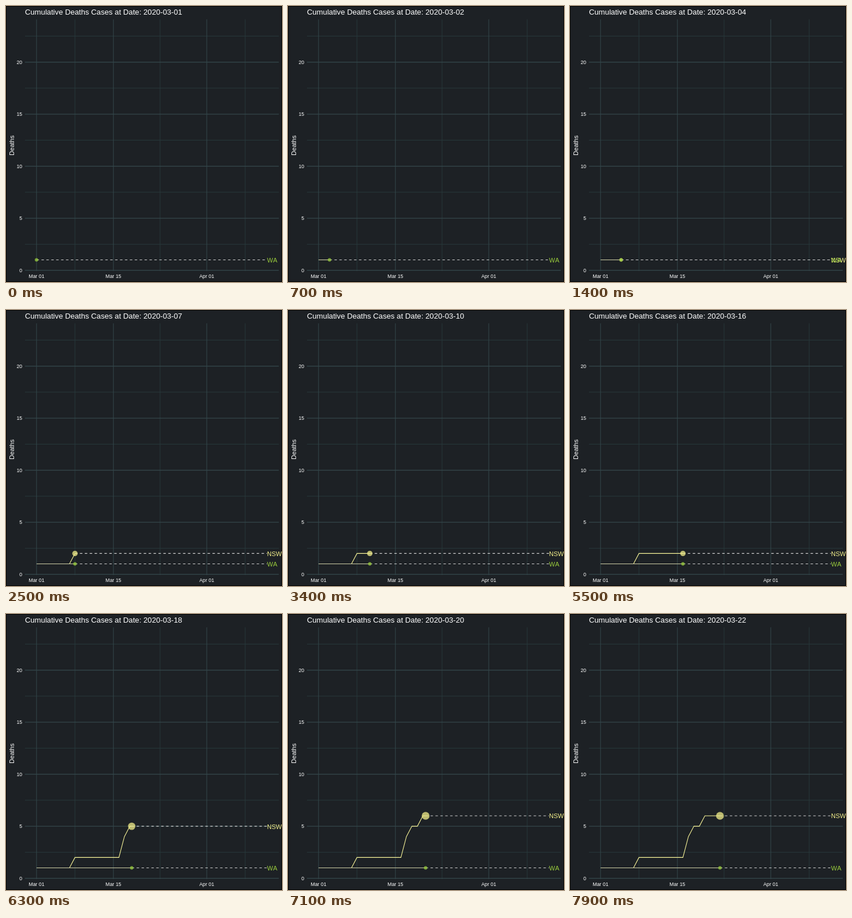
These frames come from a looping animation (480 px wide and 480 px high, 8000 ms). An HTML page:

```html
<!DOCTYPE html>
<html lang="en">
<head>
<meta charset="utf-8">
<title>Cumulative Deaths</title>
<style>
  html, body { margin: 0; width: 100%; height: 100%; overflow: hidden; background: #1d2125; }
  svg { display: block; width: 480px; height: 480px; }
  text { font-family: "Liberation Sans", Arial, sans-serif; font-kerning: none; fill: #fff; }
  .title { font-size: 13.2px; }
  .axis { font-size: 11px; text-anchor: middle; }
  .tick { font-size: 8.8px; }
  .tag { font-size: 11px; }
  .major { stroke: #34474b; stroke-width: 1.07; }
  .minor { stroke: #28393b; stroke-width: 1; }
  .trail { fill: none; stroke-width: 1.07; }
  .guide { stroke: #cfcfcf; stroke-width: 1.07; stroke-dasharray: 4.27; }
  .dot { fill-opacity: .75; }
</style>
</head>
<body>
<svg id="chart" viewBox="0 0 480 480">
  <rect x=".5" y=".5" width="479" height="479" fill="#1d2125" stroke="#000"/>
</svg>
<script>
const chart = document.getElementById('chart');
const STEP = 100, STEPS = 80, DAYS = 41, LAST = 149;
const END_X = 454;
const px = day => 53.1 + day * 9.55;
const py = value => 459.6 - value * 18.1;
const radius = value => 3 + 1.7 * Math.sqrt(value - 1);
const stepOf = day => Math.round(day * LAST / DAYS);
const mix = (a, b, k) => a + (b - a) * k;

function set(node, attrs) {
  for (const key in attrs) node.setAttribute(key, attrs[key]);
}
function add(tag, attrs, text = '') {
  const node = document.createElementNS('http://www.w3.org/2000/svg', tag);
  set(node, attrs);
  node.textContent = text;
  return chart.appendChild(node);
}
const hLine = (value, cls) =>
  add('line', { class: cls, x1: 33, x2: 474.5, y1: py(value), y2: py(value) });
const vLine = (day, cls) =>
  add('line', { class: cls, x1: px(day), x2: px(day), y1: 23.3, y2: 461 });

for (let v = 2.5; v < 24; v += 5) hLine(v, 'minor');
for (const day of [7, 22.5, 38]) vLine(day, 'minor');
for (let v = 0; v <= 20; v += 5) {
  hLine(v, 'major');
  add('text', { class: 'tick', x: 28.2, y: py(v) + 3.3, 'text-anchor': 'end' }, v);
}
for (const [day, name] of [[0, 'Mar 01'], [14, 'Mar 15'], [31, 'Apr 01']]) {
  vLine(day, 'major');
  add('text', { class: 'tick', x: px(day), y: 473, 'text-anchor': 'middle' }, name);
}
add('text', { class: 'axis', transform: 'translate(13.5 242.5) rotate(-90)' }, 'Deaths');
const title = add('text', { class: 'title', x: 33, y: 15 });

// Each series lists its daily counts from its first day on
const series = [
  { name: 'NSW', first: 3, color: '#f2ee8a', line: '#fbf79a',
    counts: [1, 1, 1, 1, 2, 2, 2, 2, 2, 2, 2, 2, 2, 4, 5, 5, 6, 6, 6, 6] },
  { name: 'WA', first: 0, color: '#9acd3c', line: '#cfcfa6', counts: Array(23).fill(1) }
];
function layer(key, make) {
  for (const s of series) s[key] = make(s);
}
layer('trail', s => add('polyline', { class: 'trail', stroke: s.line }));
layer('guide', () => add('line', { class: 'guide', x2: END_X }));
layer('dot', s => add('circle', { class: 'dot', fill: s.color }));
layer('tag', s => add('text', { class: 'tag', x: END_X, style: `fill:${s.color}` }, s.name));

function drawSeries(s, step, day) {
  const shown = step >= stepOf(s.first);
  for (const part of [s.trail, s.guide, s.dot, s.tag])
    part.style.display = shown ? '' : 'none';
  if (!shown) return;

  const k = (step - stepOf(day)) / (stepOf(day + 1) - stepOf(day));
  const i = day - s.first;
  const from = s.counts[i], to = s.counts[i + 1];
  const x = px(day + k), y = py(mix(from, to, k));
  const path = s.counts.slice(0, i + 1).map((v, j) => [px(s.first + j), py(v)]);
  path.push([x, y]);

  set(s.trail, { points: path.join(' ') });
  set(s.guide, { x1: x, y1: y, y2: y });
  set(s.dot, { cx: x, cy: y, r: mix(radius(from), radius(to), k) });
  set(s.tag, { y: y + 4.4 });
}

function draw(step) {
  let day = 0;
  while (stepOf(day + 1) <= step) day++;
  const date = Math.floor(step * DAYS / LAST) + 1;
  title.textContent = 'Cumulative Deaths Cases at Date: 2020-03-' + String(date).padStart(2, '0');
  for (const s of series) drawSeries(s, step, day);
}

const start = performance.now();
function tick() {
  draw(Math.floor((performance.now() - start) / STEP) % STEPS);
  requestAnimationFrame(tick);
}
tick();
</script>
</body>
</html>
```
